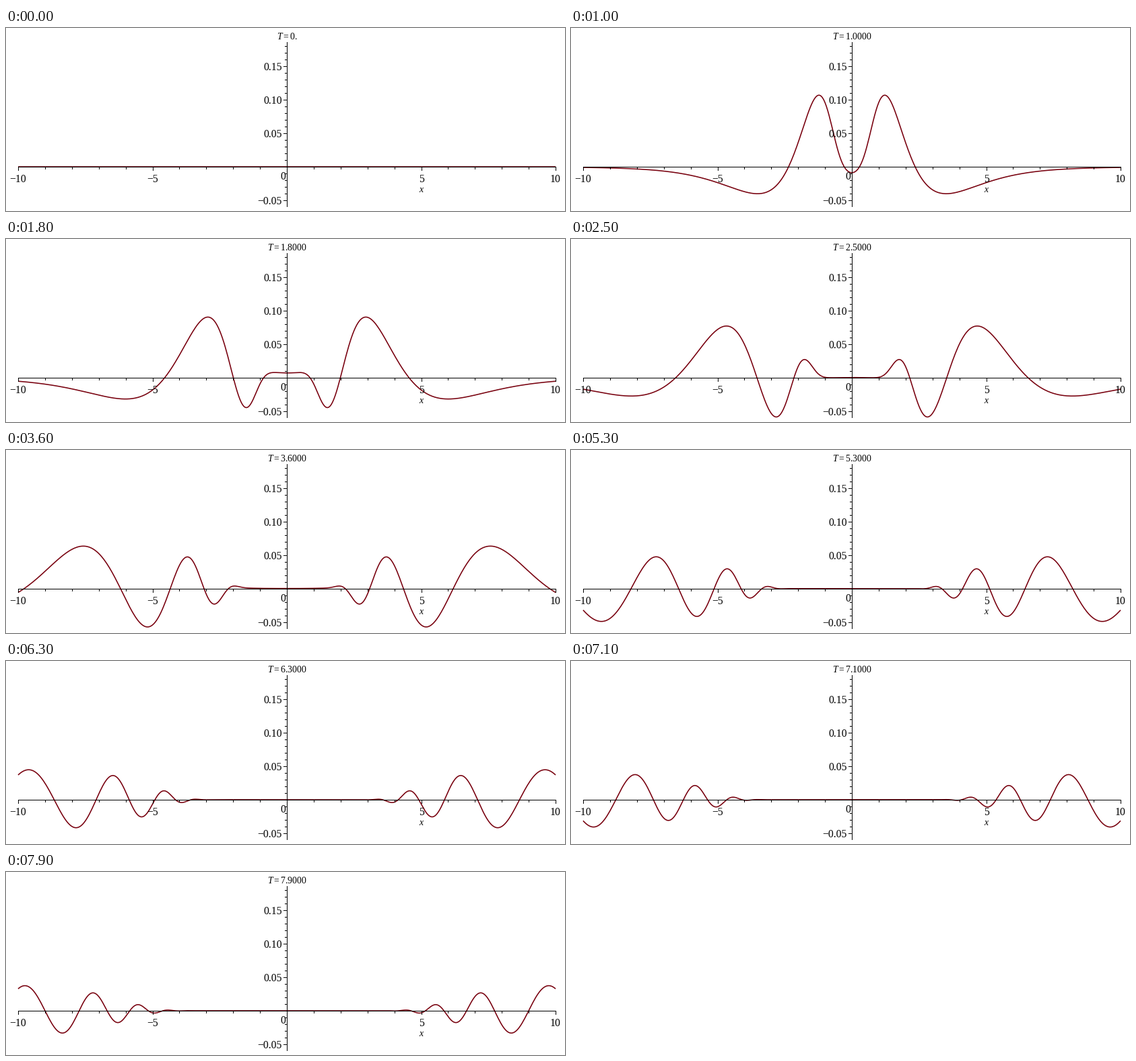
A matplotlib script for the animation above (8000 ms loop, 830 by 273 pixels).

```python
import numpy as np
import matplotlib.pyplot as plt
from matplotlib.animation import FuncAnimation

W, H, DPI = 830, 273, 100
FRAMES, INTERVAL = 80, 100
X0, Y0 = 417, 207            # pixel position of the axes' crossing
SX, SY = 39.9, 1000          # pixels per unit
G, DEPTH = 9.81, 1.0

plt.rcParams.update({
    "font.family": "Liberation Serif",
    "mathtext.fontset": "custom",
    "mathtext.rm": "Liberation Serif",
    "mathtext.it": "Liberation Serif:italic",
})


def pt(px):
    return px * 72 / DPI


# Water waves of finite depth after a surface impulse 1 / (1 + x^2)
x = np.linspace(-10, 10, 401)
k = np.linspace(0, 16, 801)
omega = np.sqrt(G * k * np.tanh(k * DEPTH))
weight = omega * np.exp(-k) * (k[1] - k[0]) / G
modes = np.cos(np.outer(x, k))


def surface(t):
    return modes @ (weight * np.sin(omega * t))


fig = plt.figure(figsize=(W / DPI, H / DPI), dpi=DPI, facecolor="white")
ax = fig.add_axes([0, 0, 1, 1])
ax.set_xlim(0, W)
ax.set_ylim(H, 0)
ax.axis("off")


def rule(xs, ys):
    # whole-pixel ends: snapping fills exactly one row or column
    ax.plot(xs, ys, color="black", lw=pt(1), solid_capstyle="projecting",
            snap=True, zorder=3)


def label(px, py, s, ha="center", size=15.8, **kw):
    return ax.text(px, py, s, ha=ha, va="baseline", fontsize=pt(size),
                   color="black", zorder=4, **kw)


def number(value, spec):
    return format(value, spec).replace("-", "\u2212")


rule([18, 816], [Y0, Y0])
rule([X0, X0], [21, 266])

for n in range(-10, 11):
    px = X0 + n * SX
    major = n % 5 == 0
    rule([px, px], [Y0, Y0 + (5 if major else 3)])
    if major and n:
        label(px, 230, number(n, "d"))

for n in range(-5, 19):
    py = Y0 - n * SY / 100
    major = n % 5 == 0
    rule([X0 - (5 if major else 3), X0], [py, py])
    if major and n:
        label(409.5, py + 6, number(n / 100, ".2f"), ha="right")

label(411, 226, "0")
label(616.3, 245, "x", size=13.5, style="italic")

title = label(X0, 17, "", size=13.8)
curve, = ax.plot([], [], color="#78000e", lw=pt(1.6), snap=False,
                 solid_capstyle="butt", zorder=2)


def update(i):
    t = i / 10
    curve.set_data(X0 + SX * x, Y0 - SY * surface(t))
    value = "0." if i == 0 else f"{t:.5f}" if t < 1 else f"{t:.4f}"
    title.set_text(f"$T=${value}")
    return curve, title


anim = FuncAnimation(fig, update, frames=FRAMES, interval=INTERVAL,
                     repeat=True, repeat_delay=0)
plt.show()
```
